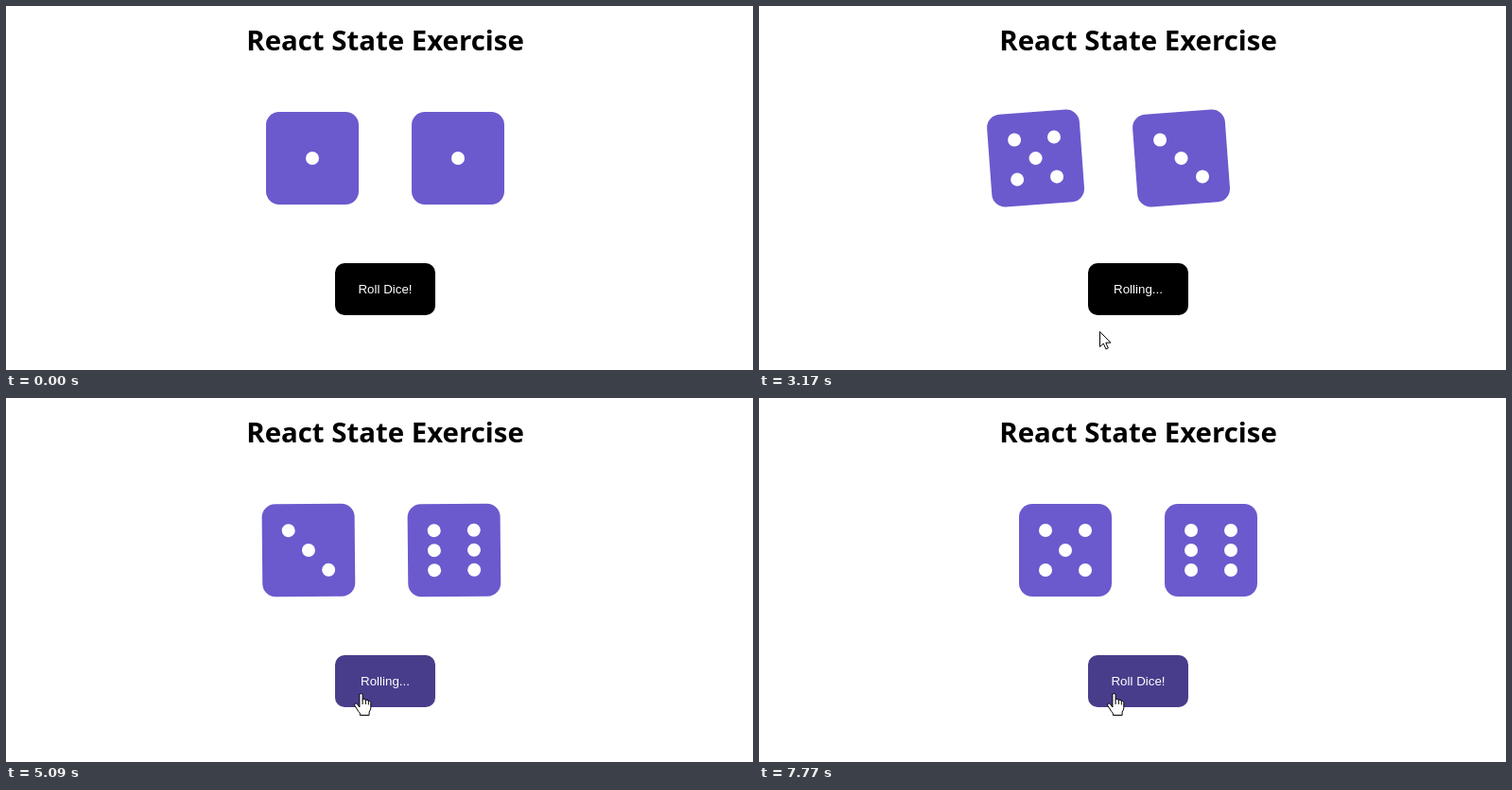
Write an HTML page with a canvas that moves like this. It is 790x385 px and loops after 8000 ms.

```html
<!DOCTYPE html>
<html lang="en">
<head>
<meta charset="utf-8">
<title>React State Exercise</title>
<style>
  html, body { margin: 0; width: 100%; height: 100%; overflow: hidden; background: #fff; }
  canvas { display: block; }
</style>
</head>
<body>
<canvas id="stage" width="790" height="385"></canvas>
<script>
const ctx = document.getElementById('stage').getContext('2d');
const LOOP = 8000, STEP = 76.85, OFFSET = 4;
const SPEED = 1.03, ROLL_TIME = 1000 / SPEED;
const SLOT = 154, DIE = 98, GAP = 21;

// press: mouse down, start: dice begin to wobble
const rolls = [
  { press: 1460, start: 1631, faces: [3, 4] },
  { press: 2840, start: 2994, faces: [5, 3] },
  { press: 4150, start: 4280, faces: [3, 6] },
  { press: 5380, start: 5510, faces: [2, 4] },
  { press: 6605, start: 6751, faces: [5, 6] }
];

// progress, shift as a share of the slot, degrees
const wobble = [
  [0, 0, 0], [0.15, -0.25, -5], [0.3, 0.2, 3], [0.45, -0.15, -3],
  [0.6, 0.1, 2], [0.75, -0.05, -1], [1, 0, 0]
];

// time, x, y of the pointer tip
const pointerPath = [
  [80, 634, 367], [158, 560, 348], [235, 470, 324], [311, 402, 298], [388, 385.5, 289],
  [3001, 385.5, 289], [3078, 373, 314], [3155, 360.5, 344.5], [3232, 358, 355],
  [3460, 358, 355], [3693, 375.5, 313], [LOOP, 375.5, 313]
];

const hand = new Path2D(
  'M-1.6 14V1.2Q-1.6-.5 0-.5Q1.6-.5 1.6 1.2V6.5Q1.8 5.3 3.2 5.4Q4.8 5.5 4.8 7' +
  'Q5.2 6 6.4 6.2Q7.8 6.4 7.8 8Q8.3 7.2 9.2 7.6Q10.3 8 10.3 9.6V14.5' +
  'Q10.3 17 8.6 19V22.5H-1.2V20.2Q-3.2 18.4-4.4 16L-6.6 12.4' +
  'Q-7.4 10.8-6.2 10.2Q-4.9 9.7-3.6 11.2Z');
const knuckles = new Path2D('M1.6 6.5V11M4.8 7V11M7.8 8V11.5');
const arrow = new Path2D('M0 0V16L3.8 12.6L6.4 18.4L8.8 17.4L6.3 11.7H11.4Z');

// CSS "ease": cubic-bezier(.25, .1, .25, 1)
function ease(x) {
  const curve = (s, a, b) => 3 * a * s * (1 - s) ** 2 + 3 * b * s * s * (1 - s) + s ** 3;
  let lo = 0, hi = 1;
  for (let i = 0; i < 24; i++) {
    const mid = (lo + hi) / 2;
    if (curve(mid, 0.25, 0.25) < x) lo = mid; else hi = mid;
  }
  return curve(lo, 0.1, 1);
}

function sample(keys, t, easing = x => x) {
  const i = keys.findIndex(key => t < key[0]);
  if (i < 0) return keys[keys.length - 1].slice(1);
  if (i === 0) return keys[0].slice(1);
  const a = keys[i - 1], b = keys[i];
  const p = easing((t - a[0]) / (b[0] - a[0]));
  return [a[1] + (b[1] - a[1]) * p, a[2] + (b[2] - a[2]) * p];
}

function box(x, y, w, h, r, color) {
  ctx.fillStyle = color;
  ctx.beginPath();
  ctx.roundRect(x, y, w, h, r);
  ctx.fill();
}

function label(text, y, font, color) {
  ctx.font = font;
  ctx.fillStyle = color;
  ctx.textAlign = 'center';
  ctx.fillText(text, 401, y);
}

function pips(face) {
  const spots = face % 2 ? [[0, 0]] : [];
  if (face > 1) spots.push([-1, -1], [1, 1]);
  if (face > 3) spots.push([1, -1], [-1, 1]);
  if (face === 6) spots.push([-1, 0], [1, 0]);
  return spots;
}

function drawDie(cx, face, [shift, degrees]) {
  ctx.save();
  ctx.translate(cx + shift * SLOT, 161);
  ctx.rotate(degrees * Math.PI / 180);
  box(-DIE / 2, -DIE / 2, DIE, DIE, 14, '#6a5acd');
  ctx.fillStyle = '#fff';
  for (const [x, y] of pips(face)) {
    ctx.beginPath();
    ctx.arc(x * GAP, y * GAP, 7, 0, Math.PI * 2);
    ctx.fill();
  }
  ctx.restore();
}

function drawPointer(x, y, overButton) {
  const shape = overButton ? hand : arrow;
  ctx.save();
  ctx.translate(x, y);
  ctx.fillStyle = '#fff';
  ctx.strokeStyle = '#000';
  ctx.lineWidth = 1;
  ctx.lineJoin = 'round';
  ctx.fill(shape);
  ctx.stroke(shape);
  if (overButton) ctx.stroke(knuckles);
  ctx.restore();
}

function draw(t) {
  const started = rolls.filter(r => t >= r.start).pop();
  const rolling = !!started && t < started.start + ROLL_TIME;
  const focused = rolls.some(r => t >= r.press && t < r.start);
  const [px, py] = sample(pointerPath, t);
  const visible = t >= pointerPath[0][0];
  const hover = visible && px >= 348 && px < 454 && py >= 272 && py < 327;

  ctx.fillStyle = '#fff';
  ctx.fillRect(0, 0, 790, 385);
  label('React State Exercise', 47, '700 29.4px "Open Sans", "Noto Sans", sans-serif', '#000');

  const pose = rolling ? sample(wobble, (t - started.start) / ROLL_TIME, ease) : [0, 0];
  const faces = started ? started.faces : [1, 1];
  faces.forEach((face, i) => drawDie(324 + i * SLOT, face, pose));

  if (focused) box(347, 271, 108, 57, 11, '#101010');
  box(348, 272, 106, 55, 10, hover ? '#483d8b' : '#000');
  label(rolling ? 'Rolling...' : 'Roll Dice!', 304, '13.333px "Liberation Sans", Arial, sans-serif', '#fff');

  if (visible) drawPointer(px, py, hover);
}

function tick() {
  const t = performance.now() % LOOP;
  draw(Math.max(0, OFFSET + STEP * Math.floor((t - OFFSET) / STEP)));
  requestAnimationFrame(tick);
}
tick();
</script>
</body>
</html>
```
